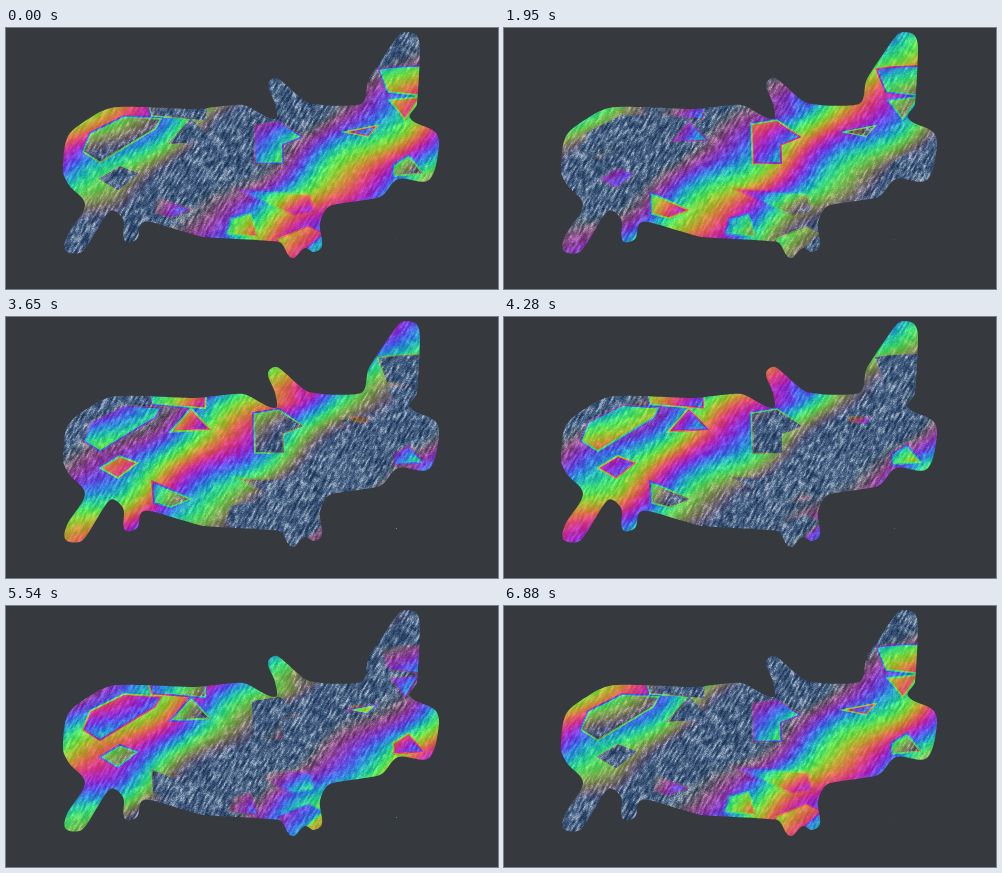
Animation of 492 by 261 pixels, one loop 6.95 s. Source, as an HTML page with a canvas:

```html
<!DOCTYPE html>
<html lang="en">
<head>
<meta charset="utf-8">
<title>Denim rainbow</title>
<style>
  html, body { margin: 0; width: 100%; height: 100%; overflow: hidden; background: #36393e; }
  canvas { display: block; width: 492px; height: 261px; }
</style>
</head>
<body>
<canvas id="stage" width="492" height="261"></canvas>
<script>
const W = 492, H = 261, LOOP = 6950, STEPS = 99;
const PERIOD = 190;          // distance between two rainbow bands, px
const BG = [54, 57, 62];

const outline = [
  [57, 143], [62, 108], [87, 88], [105, 80], [135, 79], [190, 81], [237, 77], [269, 91],
  [269, 76], [262, 56], [271, 50], [303, 75], [355, 76], [363, 51], [394, 6], [409, 6],
  [414, 18], [411, 76], [404, 90], [429, 104], [433, 118], [423, 152], [392, 151], [374, 169],
  [324, 178], [314, 195], [316, 218], [308, 224], [299, 220], [286, 230], [273, 214], [198, 209],
  [152, 196], [136, 195], [131, 211], [119, 213], [117, 191], [104, 183], [77, 223], [60, 223],
  [61, 208], [79, 177], [63, 157]
];

// Patches of cloth: phase lead in px, then corner points
const patches = [
  [38, 372, 41, 386, 39, 416, 38, 413, 67, 382, 64],
  [30, 383, 72, 414, 69, 399, 91],
  [45, 247, 96, 273, 92, 296, 109, 277, 117, 277, 135, 249, 136],
  [20, 225, 190, 245, 186, 251, 208, 221, 206],
  [34, 146, 164, 184, 182, 165, 190, 148, 186],
  [44, 94, 151, 114, 139, 131, 146, 112, 161],
  [40, 164, 115, 185, 91, 203, 112],
  [50, 142, 76, 200, 78, 199, 91, 146, 88],
  [42, 77, 124, 84, 105, 118, 88, 155, 91, 149, 101, 94, 134],
  [58, 339, 104, 371, 98, 362, 108],
  [30, 387, 137, 403, 127, 416, 145, 388, 148],
  [-20, 272, 211, 302, 198, 318, 205, 285, 234],
  [12, 227, 160, 304, 167, 307, 183, 288, 187]
];

const stage = document.getElementById('stage').getContext('2d');

function layer(paint) {
  const c = document.createElement('canvas');
  c.width = W;
  c.height = H;
  const g = c.getContext('2d', { willReadFrequently: true });
  paint(g);
  return g.getImageData(0, 0, W, H).data;
}

// Closed curve whose handles scale with each span
function smoothLoop(g, pts) {
  const n = pts.length, at = i => pts[(i + n) % n];
  const dir = i => {
    const a = at(i - 1), b = at(i + 1), len = Math.hypot(b[0] - a[0], b[1] - a[1]);
    return [(b[0] - a[0]) / len, (b[1] - a[1]) / len];
  };
  g.beginPath();
  g.moveTo(...pts[0]);
  for (let i = 0; i < n; i++) {
    const b = at(i), c = at(i + 1), u = dir(i), v = dir(i + 1);
    const k = Math.min(9, 0.3 * Math.hypot(c[0] - b[0], c[1] - b[1]));
    g.bezierCurveTo(b[0] + u[0] * k, b[1] + u[1] * k, c[0] - v[0] * k, c[1] - v[1] * k, c[0], c[1]);
  }
  g.closePath();
}

const mask = layer(g => {
  smoothLoop(g, outline);
  g.fill();
});

// Phase lead stored as grey, 128 meaning none; seams sit halfway
const lead = layer(g => {
  const grey = v => `rgb(${v},${v},${v})`;
  g.fillStyle = grey(128);
  g.fillRect(0, 0, W, H);
  g.lineWidth = 1.6;
  for (const [shift, ...p] of patches) {
    g.beginPath();
    for (let i = 0; i < p.length; i += 2) g.lineTo(p[i], p[i + 1]);
    g.closePath();
    g.fillStyle = grey(128 + shift);
    g.fill();
    g.strokeStyle = grey(128 + Math.round(shift / 2));
    g.stroke();
  }
});

const clamp = v => Math.max(0, Math.min(1, v));
const ramp = (a, b, v) => { const t = clamp((v - a) / (b - a)); return t * t * (3 - 2 * t); };
const mix = (a, b, t) => a + (b - a) * t;

function hash(x, y) {
  const v = Math.sin(x * 127.1 + y * 311.7) * 43758.5453;
  return v - Math.floor(v);
}

function noise(x, y) {
  const i = Math.floor(x), j = Math.floor(y), u = x - i, v = y - j;
  return mix(mix(hash(i, j), hash(i + 1, j), u), mix(hash(i, j + 1), hash(i + 1, j + 1), u), v);
}

// Twill: short steep threads plus fine grain, 0 dark to 1 light
function twill(x, y) {
  const across = x * 0.87 + y * 0.5, along = y * 0.87 - x * 0.5;
  const thread = noise(across / 1.7, along / 4.5);
  const rib = Math.sin(across * 1.45);
  return clamp(0.44 + (thread - 0.5) * 0.85 + rib * 0.1 + (hash(x, y) - 0.5) * 0.3);
}

const DARK = [27, 50, 84], MID = [76, 103, 138], LIGHT = [184, 195, 209];
function denim(v) {
  return DARK.map((d, k) => v < 0.5 ? mix(d, MID[k], v * 2) : mix(MID[k], LIGHT[k], v * 2 - 1));
}

const cells = [];
for (let y = 0; y < H; y++) {
  for (let x = 0; x < W; x++) {
    const i = (y * W + x) * 4, dot = x === 390 && y === 211;
    const cover = dot ? 0.8 : mask[i + 3] / 255;
    if (!cover) continue;
    const v = twill(x, y);
    const wave = 4 * Math.sin(x / 19 + y / 37) + 3 * Math.sin(y / 13 - x / 41);
    const edge = 10 * clamp((110 - x) / 50);
    const horn = x > 258 && x < 300 && y < 85 ? 12 * clamp((85 - y) / 15) : 0;
    const fray = (v - 0.5) * 5;
    const eye = ((x - 352) / 9) ** 2 + ((y - 102) / 4) ** 2 < 1;
    cells.push({
      i, cover, v,
      base: dot ? [75, 72, 74] : eye ? [mix(70, 190, v), mix(50, 160, v), mix(45, 130, v)] : denim(v),
      pos: 0.6 * x + 0.8 * y + lead[i] - 128 + wave + edge + horn + fray
    });
  }
}

// Colour and strength by distance from the middle of the band
const SHADES = 760;
const shades = Array.from({ length: SHADES }, (_, n) => {
  const d = (n / SHADES - 0.5) * PERIOD;
  const hue = -(d - 10) * 3 * 2 * Math.PI / PERIOD;
  const rgb = [0, 1, 2].map(k => 142 + 112 * Math.cos(hue - k * 2 * Math.PI / 3));
  return [...rgb, 0.8 * ramp(-68, -26, d) * (1 - ramp(45, 82, d))];
});

const img = stage.createImageData(W, H);
for (let i = 0; i < img.data.length; i += 4) img.data.set([...BG, 255], i);

function draw(step) {
  const center = 320 - PERIOD * step / STEPS;
  for (const { i, cover, v, base, pos } of cells) {
    const turn = (pos - center) / PERIOD + 0.5;
    const s = shades[Math.floor((turn - Math.floor(turn)) * SHADES)];
    const glow = (v - 0.45) * 34;
    for (let k = 0; k < 3; k++) {
      img.data[i + k] = mix(BG[k], mix(base[k], s[k] + glow, s[3]), cover);
    }
  }
  stage.putImageData(img, 0, 0);
}

let shown = 0;
const start = performance.now();
function tick(now) {
  const t = Math.max(0, now - start) % LOOP;
  const step = Math.floor(t / LOOP * STEPS);
  if (step !== shown) draw(shown = step);
  requestAnimationFrame(tick);
}
draw(0);
requestAnimationFrame(tick);
</script>
</body>
</html>
```
